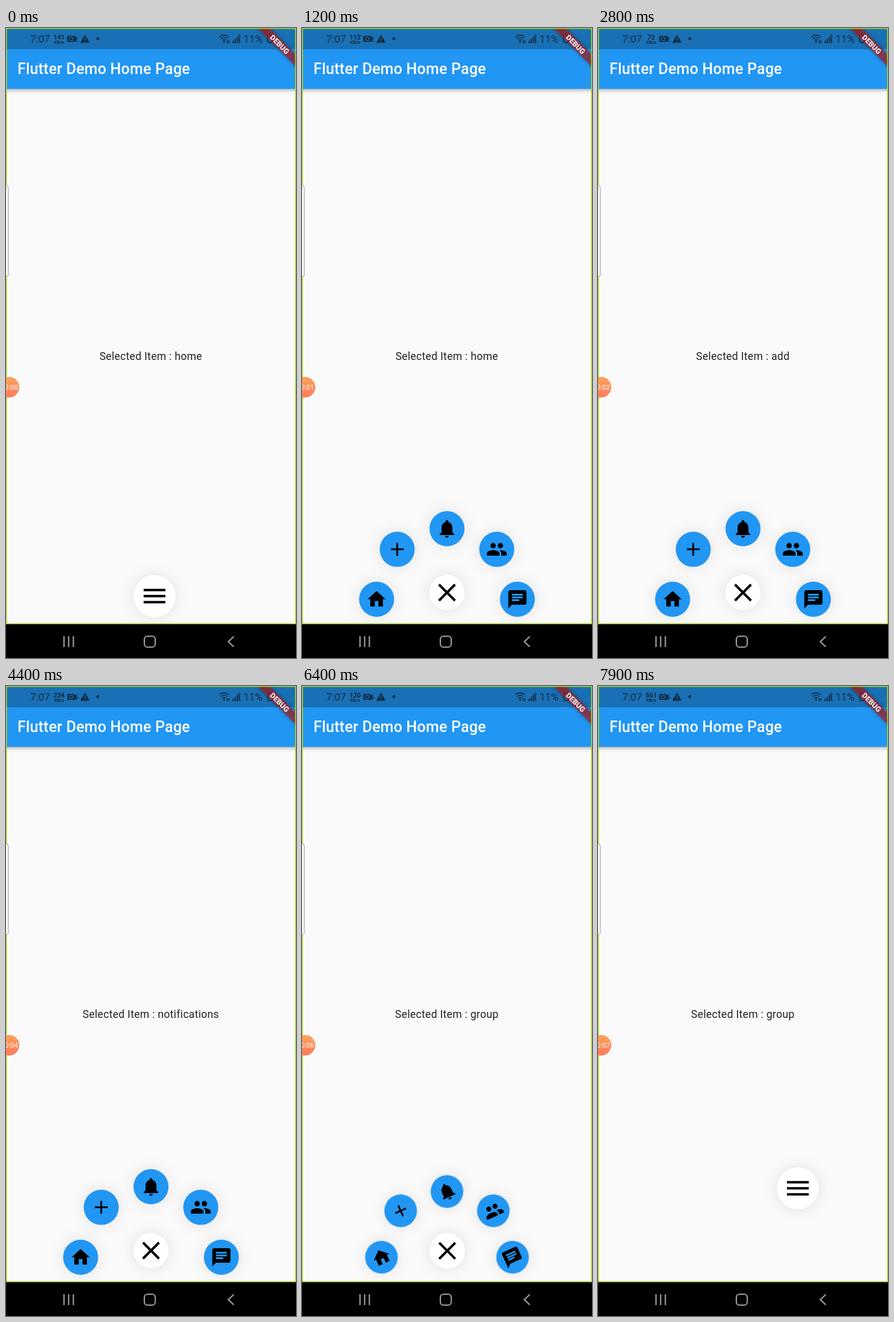
Animation of 480x1040 px, one loop 8 s. Source, as an HTML page:

```html
<!DOCTYPE html>
<html lang="en">
<head>
<meta charset="utf-8">
<title>Circular menu</title>
<style>
  html, body { margin: 0; width: 100%; height: 100%; overflow: hidden; background: #fafafa; }
  svg { display: block; width: 100vw; height: 100vh; }
  text { font-family: Roboto, "Open Sans", sans-serif; }
  .title { font-size: 25px; font-weight: 500; letter-spacing: .19px; fill: #fff; }
  .label { font-size: 17.5px; letter-spacing: .31px; fill: #222; text-anchor: middle; }
  .status { fill: #12293c; }
  .clock { font-size: 17px; }
  .speed { font-weight: 700; text-anchor: middle; }
  .line { fill: none; stroke: #12293c; stroke-width: 1.6; }
  .nav { fill: none; stroke: #9c9c9c; stroke-width: 2.2; }
  .bar { filter: drop-shadow(0 2px 3px rgba(0, 0, 0, .32)); }
  .banner { filter: drop-shadow(0 0 3px rgba(0, 0, 0, .5)); }
  .disc { filter: drop-shadow(0 0 12px rgba(0, 0, 0, .1)); }
  .debug { font-size: 12.2px; font-weight: 900; fill: #fff; fill-opacity: .9; text-anchor: middle; }
  .timer { font-size: 11.5px; fill: #fff; text-anchor: end; }
</style>
</head>
<body>
<svg viewBox="0 0 480 1040" preserveAspectRatio="none">
  <defs>
    <linearGradient id="warm" x1="0" y1="0" x2="0" y2="1">
      <stop offset="0" stop-color="#f9a45c"/>
      <stop offset="1" stop-color="#ff7a5c"/>
    </linearGradient>
  </defs>

  <rect width="480" height="1040" fill="#fafafa"/>
  <rect class="bar" x="-10" y="-10" width="500" height="110.5" fill="#2196f3"/>
  <rect width="480" height="35" fill="#1970b5"/>
  <text class="title" x="19" y="76">Flutter Demo Home Page</text>

  <g class="status">
    <text class="clock" x="40" y="24">7:07</text>
    <text class="speed" id="rate" x="88" y="18.6" font-size="10.8"></text>
    <text class="speed" id="unit" x="88" y="26" font-size="7.4"></text>
    <path d="M103 13h10q1.500 0 1.500 1.500v1.500l3-2v9l-3-2q0 2-1.500 2h-10q-1.500 0-1.500-1.500v-7q0-1.500 1.500-1.500z"/>
    <circle cx="108.300" cy="18" r="3" fill="none" stroke="#1970b5" stroke-width="1.300"/>
    <path d="M130.700 11l7.800 13.300h-15.600z"/>
    <path d="M130.700 15.500v4.300M130.700 21v1.700" stroke="#1970b5" stroke-width="1.600"/>
    <circle cx="152" cy="17.600" r="2.400"/>
    <path class="line" d="M353 14.500q8-6.500 16 0M355.500 17.500q5.500-4.500 11 0M358 20.500q3-2.500 6 0"/>
    <circle cx="361" cy="23" r="1.500"/>
    <path class="line" stroke-width="1.200" d="M366.500 25v-5M369.500 20v5"/>
    <path class="line" style="stroke-width:2" d="M376 25v-4M379.500 25v-7M383 25v-10.500M386.500 25v-14"/>
    <text class="clock" x="393" y="24">11%</text>
    <rect class="line" x="433" y="12" width="8" height="12" rx="1.500"/>
  </g>

  <rect class="banner" x="-70" y="-7.200" width="140" height="14.400" fill="#b71c1c" fill-opacity=".63" transform="translate(453 27) rotate(45)"/>
  <text class="debug" y="4.400" transform="translate(453 27) rotate(45)">DEBUG</text>

  <text class="label" id="label" x="239.700" y="548"></text>
  <g id="menu"></g>

  <rect y="984" width="480" height="56"/>
  <path class="nav" d="M96 1004v18M103.700 1004v18M111.500 1004v18"/>
  <rect class="nav" x="229" y="1004" width="18" height="18" rx="5"/>
  <path class="nav" d="M377 1004.500l-9 8.500 9 8.500"/>

  <rect x=".75" y=".75" width="478.500" height="982.700" fill="none" stroke="#a6d62e" stroke-width="1.500"/>
  <rect x="-6" y="260.500" width="10" height="150" rx="4" fill="#f7f7f7" stroke="#adadad" stroke-width="1.200"/>
  <circle cx="5" cy="593" r="17" fill="url(#warm)"/>
  <text class="timer" id="timer" x="20" y="597.300"></text>
</svg>

<script>
const LOOP = 8000, STEP = 100;
const HUB = { x: 240, y: 943, radius: 116.5 };
const OPEN_AT = 367, CLOSE_AT = 6243, DURATION = 500;

const ICONS = [
  "M10 20v-6h4v6h5v-8h3L12 3 2 12h3v8z",
  "M19 13h-6v6h-2v-6H5v-2h6V5h2v6h6z",
  "M12 22c1.100 0 2-.9 2-2h-4c0 1.100.89 2 2 2zm6-6v-5c0-3.070-1.640-5.640-4.500-6.320V4c0-.83-.67-1.500-1.500-1.500s-1.500.67-1.500 1.500v.68C7.630 5.360 6 7.920 6 11v5l-2 2v1h16v-1z",
  "M16 11a3 3 0 1 0 0-6 3 3 0 0 0 0 6zM8 11a3 3 0 1 0 0-6 3 3 0 0 0 0 6zm0 2c-2.330 0-7 1.170-7 3.500V19h14v-2.500c0-2.330-4.670-3.500-7-3.500zm8 0c-.29 0-.62.02-.97.05 1.160.84 1.970 1.970 1.970 3.450V19h6v-2.500c0-2.330-4.670-3.500-7-3.500z",
  "M20 2H4c-1.100 0-2 .9-2 2v18l4-4h14c1.100 0 2-.9 2-2V4c0-1.100-.9-2-2-2zM6 9h12v2H6zm8 5H6v-2h8zm4-6H6V6h12z"
];

// [start time, value]
const LABELS = [[0, "home"], [2700, "add"], [4300, "notifications"], [5500, "group"]];
const RATES = [[0, "141"], [600, "112"], [1600, "1.0"], [2600, "72"], [3700, "234"],
  [4700, "86"], [5700, "120"], [6700, "95"], [7700, "561"]];
const SECONDS = [[0, 0], [1200, 1], [2300, 2], [3200, 3], [4200, 4], [5200, 5], [6200, 6], [7300, 7]];
// [item, start, end]
const TAPS = [[1, 2600, 2800], [2, 4100, 4400], [3, 5300, 5600]];

const $ = id => document.getElementById(id);
const clamp = v => Math.min(1, Math.max(0, v));
const current = (list, t) => list.filter(e => e[0] <= t).pop()[1];

function make(tag, attrs, parent) {
  const el = document.createElementNS("http://www.w3.org/2000/svg", tag);
  set(el, attrs);
  return parent.appendChild(el);
}
function set(el, attrs) {
  for (const k in attrs) el.setAttribute(k, attrs[k]);
}

function bounceOut(t) {
  const part = (shift, base) => 7.5625 * (t - shift / 2.75) ** 2 + base;
  if (t < 1 / 2.75) return part(0, 0);
  if (t < 2 / 2.75) return part(1.5, .75);
  if (t < 2.5 / 2.75) return part(2.25, .9375);
  return part(2.625, .984375);
}

// cubic-bezier(.4, 0, .2, 1)
function fastOutSlowIn(x) {
  let lo = 0, hi = 1;
  for (let i = 0; i < 24; i++) {
    const s = (lo + hi) / 2, r = 1 - s;
    if (1.2 * r * r * s + .6 * r * s * s + s ** 3 < x) lo = s; else hi = s;
  }
  return lo * lo * (3 - 2 * lo);
}

function openness(t) {
  return t < CLOSE_AT
    ? bounceOut(clamp((t - OPEN_AT) / DURATION))
    : fastOutSlowIn(clamp(1 - (t - CLOSE_AT) / DURATION));
}

const menu = $("menu");
const items = ICONS.map(d => {
  const g = make("g", {}, menu);
  make("circle", { class: "disc", r: 29, fill: "#2196f3" }, g);
  make("path", { d, transform: "scale(1.5) translate(-12 -12)", "fill-rule": "evenodd" }, g);
  const splash = make("circle", { fill: "#c8c8c8" }, g);
  return { g, splash };
});
const toggle = make("g", {}, menu);
const disc = make("circle", { class: "disc", fill: "#fff" }, toggle);
const bars = [-1, 0, 1].map(side => ({ side, el: make("rect", { height: 4 }, toggle) }));

function drawItems(t, v) {
  items.forEach(({ g, splash }, i) => {
    const a = Math.PI * (1 + i / 4), d = HUB.radius * v;
    const x = HUB.x + d * Math.cos(a), y = HUB.y + d * Math.sin(a);
    set(g, {
      transform: `translate(${x} ${y}) rotate(${360 * v}) scale(${v})`,
      visibility: v > .001 ? "visible" : "hidden"
    });
    const tap = TAPS.find(([n, from, to]) => n === i && t >= from && t < to);
    const p = tap ? (t - tap[1] + STEP) / (tap[2] - tap[1] + STEP) : 0;
    set(splash, { r: 29 * Math.min(1, .4 + p), opacity: tap ? .4 * (1 - p) + .05 : 0 });
  });
}

function drawToggle(t, v) {
  const r = 34.8 - 5.8 * v;
  const drag = clamp((t - 7600) / 300);
  const x = 211 + r + 85 * drag, y = 903 + r - 108.6 * drag;
  set(toggle, { transform: `translate(${x} ${y})` });
  set(disc, { r });
  const k = clamp(v / .88), m = k * k * (3 - 2 * k);
  const w = 36 + 1.5 * m;
  for (const { side, el } of bars) {
    set(el, {
      x: -w / 2, y: -2, width: w,
      transform: `translate(0 ${10 * side * (1 - m)}) rotate(${-45 * side * m})`,
      opacity: side ? 1 : clamp(1 - 2 * m)
    });
  }
}

function draw(t) {
  const v = openness(t);
  drawItems(t, v);
  drawToggle(t, v);
  const rate = current(RATES, t);
  $("rate").textContent = rate;
  $("unit").textContent = rate.includes(".") ? "MB/s" : "KB/s";
  $("label").textContent = "Selected Item : " + current(LABELS, t);
  $("timer").textContent = "00:0" + current(SECONDS, t);
}

function tick() {
  const t = performance.now() % LOOP;
  draw(Math.floor(t / STEP) * STEP);
  requestAnimationFrame(tick);
}
tick();
</script>
</body>
</html>
```
